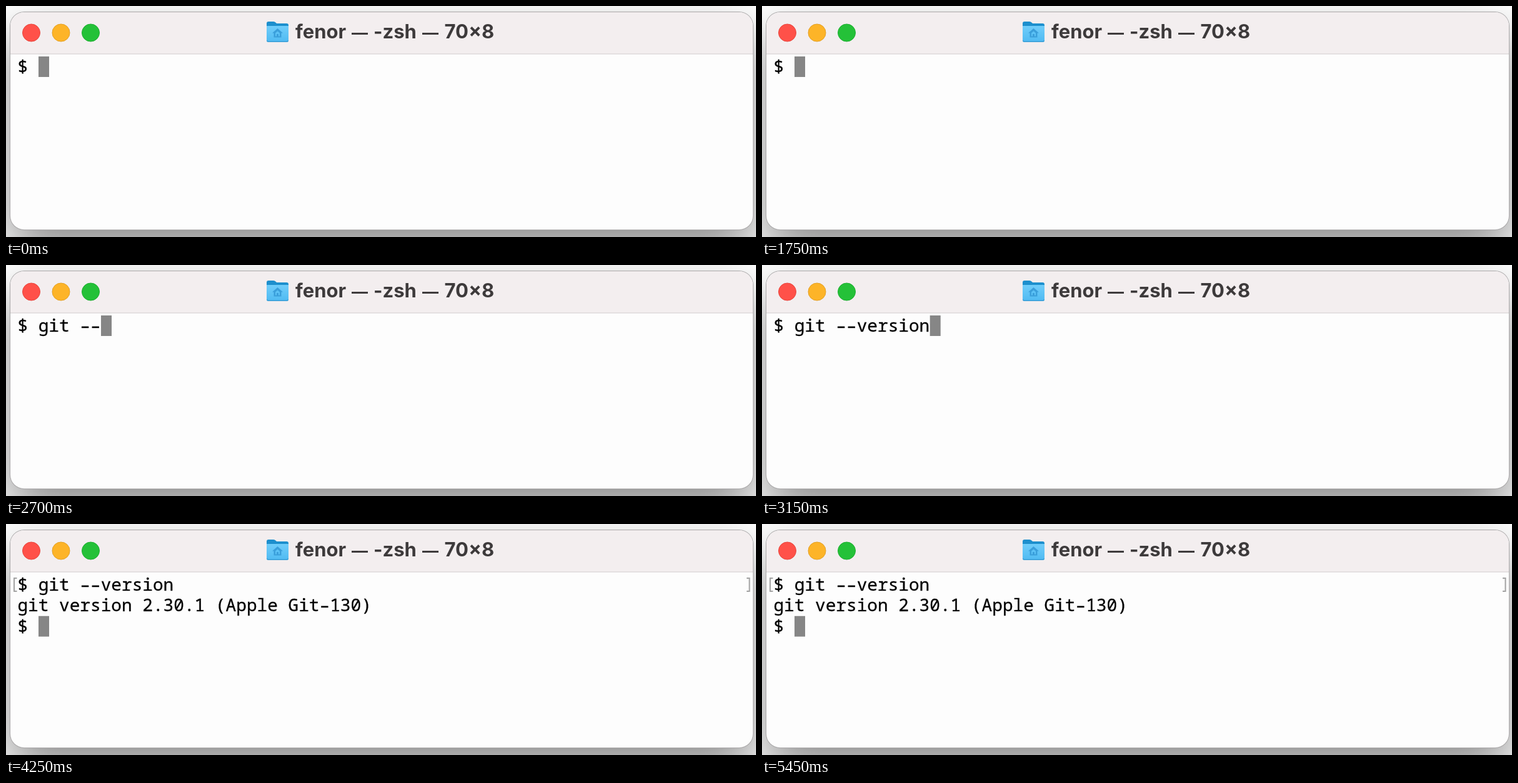
Animation of 1200x371 px, one loop 5500 ms. Source, as an HTML page:

```html
<!DOCTYPE html>
<html lang="en">
<head>
<meta charset="utf-8">
<title>Terminal</title>
<style>
  html, body { margin: 0; width: 100%; height: 100%; overflow: hidden; background: #fff; }
  .window {
    position: absolute; left: 7px; top: 10px; width: 1188px; height: 349px;
    border-radius: 22px; background: #fdfdfd;
    box-shadow: 0 0 0 1px #a9a7a8, 0 36px 80px rgba(0, 0, 0, .46);
  }
  svg { position: absolute; left: 0; top: 0; }
  .title { font: 700 31px Inter, "Open Sans", sans-serif; fill: #3d3a3b; }
  .title .dash { font-size: 26px; }
  .shell {
    font: 500 27.78px "Noto Sans Mono", "Liberation Mono", monospace;
    fill: #000; stroke: #000; stroke-width: .3;
  }
  .shell text { white-space: pre; }
  .shell .marks { fill: none; stroke: #a2a2a2; stroke-width: 2; }
</style>
</head>
<body>
<div class="window"></div>
<svg width="1200" height="371" viewBox="0 0 1200 371">
  <defs>
    <linearGradient id="folder" x2="0" y2="1">
      <stop offset="0" stop-color="#70cdfa"/>
      <stop offset="1" stop-color="#4fbaf2"/>
    </linearGradient>
  </defs>

  <path d="M7 77V32A22 22 0 0 1 29 10H1173A22 22 0 0 1 1195 32V77Z" fill="#f3eeef"/>
  <path d="M7 77H1195" stroke="#d0cbcc"/>
  <circle cx="40.5" cy="43" r="14" fill="#ff5149" stroke="#e8473f"/>
  <circle cx="88" cy="43" r="14" fill="#fdb428" stroke="#e3a024"/>
  <circle cx="135.5" cy="43" r="14" fill="#24c138" stroke="#1eae31"/>

  <path d="M417 55V28Q417 25 420 25H428Q430 25 432 27L433 28H449Q452 28 452 31V55Z" fill="#1d8fcd"/>
  <path d="M417 32H452V55Q452 58 449 58H420Q417 58 417 55Z" fill="url(#folder)"/>
  <path d="M417.5 55.5Q418 57.2 420 57.2H449Q451 57.2 451.5 55.5" fill="none" stroke="#3a9ed6" stroke-width="1.5"/>
  <path d="M434.5 36L443 43.5H440.5V50.5H428.5V43.5H426Z" fill="#3a9fdb"/>
  <path d="M431 48.5V43.5L434.5 40.5L438 43.5V48.5H436V45H433V48.5Z" fill="#5bc1f5"/>

  <g class="title">
    <text x="463" y="52">fenor</text>
    <text class="dash" x="553" y="52">—</text>
    <text x="588" y="52">-zsh</text>
    <text class="dash" x="666" y="52">—</text>
    <text x="701.5" y="52">70×8</text>
  </g>

  <rect id="cursor" width="17" height="33" fill="#868686"/>
  <g class="shell">
    <text id="command" x="18.4" y="107"></text>
    <g id="result">
      <text id="answer" x="18.4" y="140.3"></text>
      <text x="18.4" y="173.7">$</text>
      <path class="marks" d="M17.5 87H13V108H17.5M1185 87H1189.5V108H1185"/>
    </g>
  </g>
</svg>
<script>
  const LOOP = 5500, ENTER = 3850, CELL = 16.67, LINE = 33.4;
  const COMMAND = "git --version";
  const KEYS = [1800, 1950, 2100, 2250, 2450, 2600, 2750, 2800, 2900, 2950, 3000, 3050, 3150];

  const get = id => document.getElementById(id);
  const command = get("command"), result = get("result"), cursor = get("cursor");

  // The terminal face has hyphens nearly one cell wide.
  const widen = text => text.replace(/-/g, "–");
  get("answer").textContent = widen("git version 2.30.1 (Apple Git-130)");

  function draw() {
    const t = performance.now() % LOOP;
    const typed = KEYS.filter(time => time <= t).length;
    const done = t >= ENTER;
    command.textContent = widen("$ " + COMMAND.slice(0, typed));
    result.style.display = done ? "" : "none";
    cursor.setAttribute("x", 52 + (done ? 0 : typed * CELL));
    cursor.setAttribute("y", 81 + (done ? 2 * LINE : 0));
    requestAnimationFrame(draw);
  }
  draw();
</script>
</body>
</html>
```
